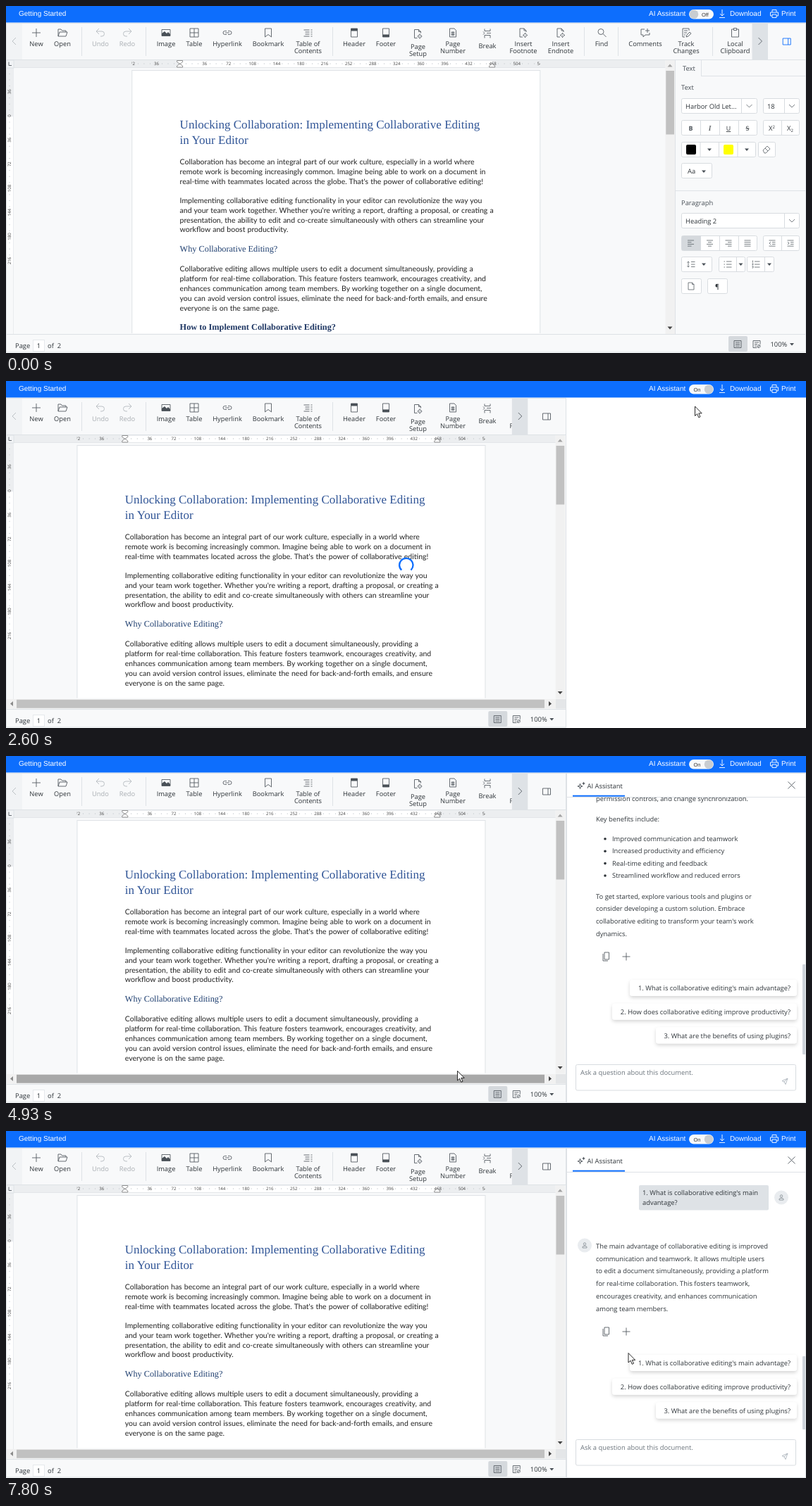
Write an HTML page that moves like this. It is 1135 by 493 pixels and loops after 8000 ms.

```html
<!DOCTYPE html>
<html lang="en">
<head>
<meta charset="utf-8">
<title>Document editor with assistant</title>
<style>
html, body { margin: 0; width: 100%; height: 100%; overflow: hidden; background: #fff; }
svg { display: block; width: 1135px; height: 493px; }
text { font-family: "Open Sans", "Noto Sans", sans-serif; font-size: 9.4px; fill: #2f353a; text-rendering: geometricPrecision; white-space: pre; }
.bar { font-family: "Liberation Sans", Arial, sans-serif; font-size: 10px; fill: #fff; }
.body { font-family: Lato, sans-serif; font-size: 10.5px; word-spacing: .5px; fill: #222; }
.h1, .h2, .h3 { font-family: "Liberation Serif", serif; fill: #2f5496; }
.h1 { font-size: 17.04px; }
.h2 { font-size: 12.3px; fill: #1f3f70; }
.h3 { font-size: 12.3px; font-weight: 700; fill: #1f3763; }
.tick { font-size: 6.1px; fill: #444; }
.tool { font-size: 9.3px; }
.sub { font-size: 6px; }
.ic { fill: none; stroke: #565d64; stroke-width: .9; }
#pane .ic { stroke-width: .8; }
</style>
</head>
<body>
<svg id="stage" viewBox="0 0 1135 493" xmlns="http://www.w3.org/2000/svg"></svg>
<script>
const BLUE = '#0d6efd', LINE = '#dee2e6', SOFT = '#f8f9fa', EDGE = '#d8dce0', PT = 0.9466;

const rect = (x, y, x2, y2, fill, extra = '') =>
  `<rect x="${x}" y="${y}" width="${x2 - x}" height="${y2 - y}" fill="${fill}" ${extra}/>`;
const text = (x, y, s, extra = '') => `<text x="${x}" y="${y}" ${extra}>${s}</text>`;
const mid = (x, y, s, extra = '') => text(x, y, s, 'text-anchor="middle" ' + extra);
const icon = (x, y, d, extra = '') => `<path class="ic" transform="translate(${x} ${y})" d="${d}" ${extra}/>`;
const solid = (x, y, d, fill = '#495057') => `<path transform="translate(${x} ${y})" d="${d}" fill="${fill}"/>`;
const hline = (x, x2, y, c = LINE) => rect(x, y, x2, y + 1, c);
const vline = (x, y, y2, c = LINE) => rect(x, y, x + 1, y2, c);
const group = (id, s, extra = '') => `<g id="${id}" ${extra}>${s}</g>`;
const clip = (id, x, y, x2, y2) => `<clipPath id="${id}">${rect(x, y, x2, y2, '#000')}</clipPath>`;
const lines = (x, y, step, list, extra) => list.map((s, i) => text(x, y + i * step, s, extra)).join('');
const chevron = (x, y) => icon(x, y, 'M-4-2L0 2L4-2');
const caret = (x, y, c) => solid(x, y, 'M-3-1.5H3L0 2Z', c);
const box = (x, y, x2, y2, fill = '#fff') =>
  rect(x + .5, y + .5, x2 - .5, y2 - .5, fill, `rx="2" stroke="${EDGE}"`);

// ---- top bar ----
function topBar() {
  return rect(0, 0, 1135, 23.5, BLUE) + text(18, 14, 'Getting Started', 'class="bar"') +
    text(912, 14, 'AI Assistant', 'class="bar"') +
    rect(969, 5, 1004, 18.5, '#f8f9fa', 'rx="6.7"') +
    '<circle id="knob" cy="11.7" r="6.3" fill="#c9cdd1"/>' +
    '<text id="state" class="bar" y="14.7" style="font-size:7.4px;fill:#333"></text>' +
    icon(1016, 11, 'M0-6V3M-3 0L0 3L3 0M-4 5.5H4', 'style="stroke:#fff"') +
    text(1027, 14, 'Download', 'class="bar"') +
    icon(1090, 11, 'M-3-2V-5.5H3V-2M-3 3H-5.5V-2H5.5V3H3M-3 1H3V5.5H-3Z', 'style="stroke:#fff"') +
    text(1100, 14, 'Print', 'class="bar"');
}

// ---- toolbar ----
const SHEET = 'M-1 6H-5V-6H1L4-3V-1M1-6V-3H4';
const GEAR = SHEET + 'M2.5 1.2a2.3 2.3 0 1 0 .1 0M2.5 3v1M2.5 0v1.2M2.5 5.8V7M-.8 3.5H.2M4.8 3.5h1';
const TOOLS = [
  [43, 'New', 'M-6 0H6M0-6V6'],
  [80, 'Open', 'M-6 5V-5H-2L-.5-3H5V-1M-6 5L-4-1H7L5 5Z'],
  [134, 'Undo', 'M-6-2H2a3.5 3.5 0 0 1 0 7H0M-2-6L-6-2L-2 2'],
  [172, 'Redo', 'M6-2H-2a3.5 3.5 0 0 0 0 7H0M2-6L6-2L2 2'],
  [227, 'Image', 'M-6-4.5H6V4.5H-6Z'],
  [267, 'Table', 'M-6-6H6V6H-6ZM0-6V6M-6 0H6'],
  [314, 'Hyperlink', 'M-1-2.5H-3.5a2.5 2.5 0 0 0 0 5H-1M1-2.5H3.5a2.5 2.5 0 0 1 0 5H1M-3 0H3'],
  [372, 'Bookmark', 'M-4.5-6H4.5V6L0 2.5L-4.5 6Z'],
  [428.5, 'Table of|Contents', 'M-6-4H2M4-4H6M-4-1H2M4-1H6M-4 2H2M4 2H6M-6 5H2M4 5H6'],
  [494, 'Header', 'M-4.5-6H4.5V6H-4.5Z'],
  [539, 'Footer', 'M-4.5-6H4.5V6H-4.5Z'],
  [584.5, 'Page|Setup', GEAR, 4],
  [634, 'Page|Number', 'M-4.5-6H2L4.5-3.5V6H-4.5ZM-2.5 0H2.5M-2.5 2.5H2.5M-1-2V4.5M1-2V4.5'],
  [683, 'Break', 'M-4-7V-4H4V-7M-4 6V2H4V6M-6-3L-4-1L-6 1M-1-1H5', 3],
  [734, 'Insert|Footnote', GEAR],
  [787, 'Insert|Endnote', GEAR],
  [845, 'Find', 'M3-1.5a4 4 0 1 1-8 0a4 4 0 1 1 8 0M2 1.5L6.5 6'],
  [907, 'Comments', 'M-1-5H-6V3H-3V6L0 3H6V0M3-6V0M0-3H6'],
  [965, 'Track|Changes', 'M4-3V-6H-5V6H-2M-3-3H2M-3 0H1M-3 3H-1M0 6L1 3L5-1L7 1L3 5Z'],
  [1034.5, 'Local|Clipboard', 'M-2-5H-5V6H5V-5H2M-2-6.5H2V-3.5H-2Z']
];

function tools() {
  let s = '';
  for (const [x, label, d, drop = 0] of TOOLS) {
    const off = label === 'Undo' || label === 'Redo';
    s += icon(x, 38 + (drop ? 1.5 : 0), d, off ? 'style="stroke:#b5babf"' : '');
    label.split('|').forEach((part, i) => {
      s += mid(x, 56.5 + drop + i * 10.3, part, `class="tool" ${off ? 'style="fill:#a9aeb3"' : ''}`);
    });
  }
  s += solid(227, 38, 'M-6 4.5V1L-2-2L1 1L3-1L6 2V4.5Z');
  s += solid(494, 38, 'M-4.5-6H4.5V-2.5H-4.5Z') + solid(539, 38, 'M-4.5 2.5H4.5V6H-4.5Z');
  for (const x of [107, 198, 463, 820, 868, 1002]) s += vline(x, 30, 71);
  return s;
}

// ---- document ----
const P1 = ['Collaboration has become an integral part of our work culture, especially in a world where',
  'remote work is becoming increasingly common. Imagine being able to work on a document in',
  "real-time with teammates located across the globe. That's the power of collaborative editing!"];
const P2 = ['Implementing collaborative editing functionality in your editor can revolutionize the way you',
  "and your team work together. Whether you're writing a report, drafting a proposal, or creating a",
  'presentation, the ability to edit and co-create simultaneously with others can streamline your',
  'workflow and boost productivity.'];
const P3 = ['Collaborative editing allows multiple users to edit a document simultaneously, providing a',
  'platform for real-time collaboration. This feature fosters teamwork, encourages creativity, and',
  'enhances communication among team members. By working together on a single document,',
  'you can avoid version control issues, eliminate the need for back-and-forth emails, and ensure',
  'everyone is on the same page.'];

function page(x) {
  const left = x - 72 * PT, cls = c => `class="${c}"`;
  return rect(left + .3, 91.5, left + 612 * PT, 600, '#fff', `stroke="${LINE}"`) +
    lines(x, 174.3, 21.4, ['Unlocking Collaboration: Implementing Collaborative Editing', 'in Your Editor'], cls('h1')) +
    lines(x, 225, 13.8, P1, cls('body')) + lines(x, 280, 13.8, P2, cls('body')) +
    text(x, 349, 'Why Collaborative Editing?', cls('h2')) +
    lines(x, 377.3, 13.8, P3, cls('body')) +
    text(x, 460, 'How to Implement Collaborative Editing?', cls('h3'));
}

function rulers(x, end) {
  const right = x + 468 * PT, grey = '#eceef0', dot = '#ced2d6';
  let s = rect(0, 77, end, 88, grey) + rect(x, 78, right, 87, '#fff') + hline(0, end, 87, '#e3e6e9');
  s += rect(0, 88, 11, 157, grey) + rect(1, 157, 10, 367, '#fff') + vline(10, 88, 466, '#e9ecef');
  s += rect(0, 77, 11, 88, '#f1f3f5', `stroke="${LINE}"`) + icon(5, 82, 'M-1-2.5V2.5H3');
  let marks = '';
  for (let p = -72; p <= 540; p += 9) {
    const tx = x + p * PT;
    if (p % 36) marks += rect(tx, 81, tx + .8, 83, dot);
    else if (p) marks += mid(tx + 1, 84, Math.abs(p), 'class="tick"');
  }
  s += `<g clip-path="url(#hr${x})">${marks}</g>`;
  for (let p = -63; p <= 216; p += 9) {
    const ty = 156 + p * PT * 1.007;
    s += p % 36 ? rect(4, ty, 6, ty + .8, dot)
      : mid(0, 0, Math.abs(p), `class="tick" transform="translate(7 ${ty}) rotate(-90)"`);
  }
  const mark = 'fill="#fff" stroke="#777" stroke-width=".8"';
  s += `<path d="M${x - 4} 77.5h8v2l-4 3l-4-3zM${x - 4} 87h8v-2l-4-3l-4 3z" ${mark}/>`;
  return s + `<path d="M${right - 4} 87h8v-2l-4-3l-4 3z" ${mark}/>`;
}

// Editor shell: doc = text left edge, bar = scrollbar left, nav = toolbar arrow left
function shell(o) {
  const { doc, bar, nav, end, bottom, thumb, id } = o;
  const shift = nav - 1058.5;
  let s = `<defs>${clip('t' + id, 24, 25, nav, 76)}${clip('d' + id, 11, 88, bar, bottom - 1)}` +
    `${clip('hr' + doc, doc - 72 * PT, 76, doc + 540 * PT, 88)}</defs>`;
  s += rect(0, 24, end, 492, SOFT) + hline(0, end, 24) + `<g clip-path="url(#t${id})">${tools()}</g>`;
  s += rect(1, 25, 23, 76, '#f1f3f5') + icon(11.5, 50, 'M2.5-5L-2.5 0L2.5 5', 'style="stroke:#b5babf"');
  s += rect(nav, 25, nav + 22.5, 76, '#dee2e6') + icon(nav + 11.5, 50, 'M-2.5-5L2.5 0L-2.5 5');
  s += icon(nav + 49.2, 50.5, 'M-5.5-4.5H5.5V4.5H-5.5ZM2-4.5V4.5', id === 'wide' ? `style="stroke:${BLUE}"` : '');
  s += hline(0, end, 76) + `<g clip-path="url(#d${id})">${page(doc)}</g>` + rulers(doc, bar);
  s += rect(bar, 77, bar + 13.5, bottom, '#f1f1f1') + rect(bar + .8, 92, bar + 12.5, thumb, '#c1c1c1');
  s += solid(bar + 6.5, 84.5, 'M-3.5 2H3.5L0-2Z', '#a3a3a3') + solid(bar + 6.5, bottom - 8.5, 'M-3.5-2H3.5L0 2Z', '#444');
  if (id === 'slim') {
    s += rect(1, 452, 780, 465.5, '#f1f1f1') + rect(780, 452, 794, 465.5, '#e4e6e8') +
      rect(15, 452.7, 764, 464.7, '#c1c1c1', 'id="hthumb"') +
      solid(8, 458.5, 'M2-3.5V3.5L-2 0Z', '#8a8a8a') + solid(772, 458.5, 'M-2-3.5V3.5L2 0Z', '#444');
  }
  s += hline(0, end, 466) + text(13, 486, 'Page') + rect(38.5, 474.5, 54.5, 490.5, '#fff', 'stroke="#e6e9ec"') +
    mid(46.5, 486, '1') + text(59, 486, 'of&#160; 2');
  s += rect(1025 + shift, 469, 1052 + shift, 491, '#d5d9dd', 'rx="2"');
  s += icon(1038 + shift, 480.5, 'M-5-5H5V5H-5ZM-3-2.5H3M-3 0H3M-3 2.5H3');
  s += icon(1065 + shift, 480.5, 'M0 5H-5V-5H5V0M-3-2.5H3M-3 0H1M-3 2.5H0M3 1a2 2 0 1 0 .1 0M1 5L5 1');
  s += text(1084.5 + shift, 484, '100%') + caret(1115 + shift, 480.5);
  return s + vline(0, 24, 492) + hline(0, end, 491.5) + vline(end - 1, 24, 492);
}

// ---- formatting pane ----
function pane() {
  const split = (x, x2, y, step) => {
    let s = box(x, y, x2, y + 22);
    for (let v = x + step; v < x2 - 5; v += step) s += vline(v, y + 1, y + 21, EDGE);
    return s;
  };
  const drop = (x, x2, cut, y, s) => box(x, y, x2, y + 22) + vline(cut, y, y + 22, EDGE) +
    text(x + 6, y + 14.7, s) + chevron((cut + x2) / 2, y + 11);
  const rows = (a, b, c) => `M${a}-4H${b}M${a}-1.3H${c}M${a} 1.4H${b}M${a} 4.1H${c}`;
  const label = 'style="fill:#495057;font-weight:500"';
  let s = rect(949, 77, 1134, 466, SOFT) + vline(949, 77, 466) + vline(986, 77, 99) + hline(986, 1135, 99);
  s += text(960, 92, 'Text', label) + text(958, 118.5, 'Text', label);
  s += drop(958, 1066, 1043, 131, 'Harbor Old Let...') + drop(1074, 1126, 1104, 131, '18');
  s += split(958, 1066, 162, 27) + split(1074, 1126, 162, 26);
  s += mid(971.5, 177, 'B', 'style="font-weight:700;font-size:8.8px;fill:#495057"') +
    mid(998.5, 177, 'I', 'style="font-family:\'Liberation Serif\',serif;font-style:italic;font-size:10.5px"') +
    mid(1025, 177, 'U', 'text-decoration="underline" style="font-size:8.8px"') +
    mid(1052, 177, 'S', 'text-decoration="line-through" style="font-size:8.8px"');
  s += text(1082, 177, 'X<tspan dy="-3" class="sub">2</tspan>') + text(1108, 177, 'X<tspan dy="2" class="sub">2</tspan>');
  s += split(958, 1064, 193, 26.5) + rect(965, 197, 979, 211, '#000', 'rx="2"') + caret(998, 204) +
    rect(1018, 197, 1032, 211, '#ff0', 'rx="2"') + caret(1051, 204);
  s += box(1067, 193, 1092, 215) + icon(1079, 204, 'M-5 1L1-5L5-1L-1 5H-3ZM-2-2L2 2');
  s += box(958, 223, 1002, 245) + text(967, 238, 'Aa') + caret(990, 235);
  s += hline(950, 1135, 262) + text(958, 282.5, 'Paragraph', label) + drop(958, 1126, 1104, 294, 'Heading 2');
  s += split(958, 1066, 326, 27) + split(1074, 1126, 326, 26) + rect(959, 327, 985, 347, '#d5d9dd');
  s += icon(971.5, 337, rows(-4.5, 4.5, 1)) + icon(998.5, 337, 'M-4.5-4H4.5M-2.5-1.3H2.5M-4.5 1.4H4.5M-2.5 4.1H2.5') +
    icon(1025, 337, 'M-4.5-4H4.5M-1-1.3H4.5M-4.5 1.4H4.5M-1 4.1H4.5') + icon(1052, 337, rows(-4.5, 4.5, 4.5));
  s += icon(1087, 337, 'M-4.5-4H4.5M0-1.3H4.5M0 1.4H4.5M-4.5 4.1H4.5M-2-2L-4 0L-2 2') +
    icon(1113, 337, 'M-4.5-4H4.5M0-1.3H4.5M0 1.4H4.5M-4.5 4.1H4.5M-4-2L-2 0L-4 2');
  s += box(958, 356, 1002, 378) + icon(972, 367, 'M-4-4V4M-5.5-2.5L-4-4L-2.5-2.5M-5.5 2.5L-4 4L-2.5 2.5M0-3.5H5.5M0 0H5.5M0 3.5H5.5') + caret(990, 367);
  const bullets = 'M-5.5-4H-4M-5.5 0H-4M-5.5 4H-4', numbers = 'M-4.5-5.5V-2.5M-5.5-1H-4V.5H-5.5M-5.5 2.5H-4V5H-5.5';
  for (const [x, x2, cut, marks] of [[1011, 1049, 1036, bullets], [1051, 1090, 1076, numbers]])
    s += box(x, 356, x2, 378) + vline(cut, 357, 377, EDGE) + caret((x2 + cut) / 2, 367) +
      icon(x + 13, 367, marks + 'M-2-4H5.5M-2 0H5.5M-2 4H5.5');
  s += box(958, 387, 987, 409) + icon(972, 398, 'M-4-5H1.5L4-2.5V5H-4ZM1.5-5V-2.5H4');
  return s + box(995, 387, 1024, 409) + mid(1009, 402, '¶');
}

// ---- assistant panel ----
const person = (x, y) => `<circle cx="${x}" cy="${y}" r="10" fill="#e9ecef"/>` +
  icon(x, y, 'M1.7-2a1.7 1.7 0 1 1-3.4 0a1.7 1.7 0 1 1 3.4 0M-3 3.5V2.5Q-3 1-1 1H1Q3 1 3 2.5V3.5Z', 'style="stroke:#8a9198"');
const question = y => rect(898, y, 1082, y + 35.5, '#dee2e6', 'rx="2"') +
  lines(903, y + 14, 14.2, ["1. What is collaborative editing's main", 'advantage?']) + person(1100, y + 17.5);
const thumbBar = (y, y2) => rect(1130, y, 1134.5, y2, '#ced4da', 'rx="1"');

function firstAnswer() {
  let s = text(837, 63.5, 'permission controls, and change synchronization.') + text(837, 93, 'Key benefits include:');
  ['Improved communication and teamwork', 'Increased productivity and efficiency', 'Real-time editing and feedback',
    'Streamlined workflow and reduced errors'].forEach((item, i) => {
    const y = 121 + i * 17.4;
    s += text(860, y, item) + `<circle cx="850" cy="${y - 3.2}" r="1.8" fill="#2f353a"/>`;
  });
  return s + lines(837, 202.5, 17.7, ['To get started, explore various tools and plugins or',
    'consider developing a custom solution. Embrace', "collaborative editing to transform your team's work", 'dynamics.']);
}

function followUps() {
  let s = icon(851, 285, 'M-4-4V6H3M-2-6H4.5V4H-2Z') + icon(880, 285, 'M-5.5 0H5.5M0-5.5V5.5');
  [[885, "1. What is collaborative editing's main advantage?"], [860, '2. How does collaborative editing improve productivity?'],
    [922, '3. What are the benefits of using plugins?']].forEach(([x, q], i) => {
    const y = 318 + i * 33.8;
    s += rect(x, y, 1122, y + 23, '#fff', 'rx="4" filter="url(#shade)"') +
      text(1113, y + 15, q, 'text-anchor="end"');
  });
  return s;
}

function waiting() {
  const bone = '#e8ebee';
  let s = question(234) + `<circle cx="821" cy="319.5" r="10" fill="${bone}"/>`;
  for (const [y, y2, x2] of [[310.5, 321, 1029], [325.5, 336, 981], [341, 351.5, 933], [356, 377.5, 1029]])
    s += rect(837, y, x2, y2, bone, 'rx="2"');
  s += rect(906, 399, 1023, 427, BLUE, 'rx="14" filter="url(#shade)"') + rect(918, 412, 928.5, 413.3, '#fff');
  return s + text(934, 416.5, 'Stop Responding', 'style="fill:#fff;font-weight:600;font-size:9.5px"') + thumbBar(293, 398);
}

const ANSWER = ['The main advantage of collaborative editing is improved', 'communication and teamwork. It allows multiple users',
  'to edit a document simultaneously, providing a platform', 'for real-time collaboration. This fosters teamwork,',
  'encourages creativity, and enhances communication', 'among team members.'];

function panel() {
  let s = `<defs>${clip('chat', 796, 59, 1135, 432)}</defs>` + rect(795, 24, 1135, 493, '#fff') + hline(795, 1135, 24);
  s += group('talk', group('first', firstAnswer()) +
    group('ask', followUps() + thumbBar(296, 424)) + group('wait', waiting()) +
    group('reply', question(77) + person(821, 162.5) + lines(837, 167, 17.7, ANSWER) + followUps() + thumbBar(320, 424)),
    'clip-path="url(#chat)"');
  s += solid(814.5, 43, 'M0-4.5L1.2-1.2L4.5 0L1.2 1.2L0 4.5L-1.2 1.2L-4.5 0L-1.2-1.2ZM0-2L-.6-.6L-2 0L-.6 .6L0 2L.6 .6L2 0L.6-.6Z') +
    solid(819.5, 39, 'M0-2.5L.7-.7L2.5 0L.7 .7L0 2.5L-.7 .7L-2.5 0L-.7-.7Z') + text(824.5, 45.5, 'AI Assistant');
  s += hline(795, 1135, 58) + rect(804, 55.7, 878, 57.7, BLUE) + icon(1114.5, 41.5, 'M-5-5L5 5M5-5L-5 5');
  s += box(808, 438, 1121, 475.5) + text(815, 453, 'Ask a question about this document.', 'style="fill:#6c757d"');
  s += icon(1105, 462, 'M4-4L-4-.5L-1 1L1 4.5ZM4-4L-1 1', 'style="stroke:#adb5bd"');
  return s + vline(795, 24, 493) + hline(795, 1135, 492) + vline(1134, 24, 493);
}

const ARROW = 'M.5 .5V14L3.6 11.2L5.8 16.3L8 15.3L5.8 10.4H10.2Z';
const HAND = 'M-1.5 1.5Q0-.8 1.3 1.5V6.5Q2.6 5.4 3.7 6.8Q5 5.9 5.9 7.3Q7.6 7 7.7 9V12.5Q7.5 15 6 16.2V18.5H-.5V17' +
  'Q-3 14-5.5 11Q-6 9-4.5 9.2L-1.5 11.5Z';

document.getElementById('stage').innerHTML =
  '<defs><filter id="shade" x="-10%" y="-40%" width="120%" height="200%">' +
  '<feDropShadow dx="0" dy="2.5" stdDeviation="2.8" flood-color="#000" flood-opacity=".16"/></filter></defs>' +
  group('wide', shell({ id: 'wide', doc: 246.6, bar: 935.5, nav: 1058.5, end: 1135, bottom: 466, thumb: 182.5 }) +
    group('pane', pane())) +
  group('slim', shell({ id: 'slim', doc: 168.8, bar: 779.7, nav: 717.8, end: 795, bottom: 451.5, thumb: 175.5 })) +
  group('panel', panel()) + topBar() +
  `<circle id="spin" cx="567.8" cy="261.5" r="9.7" fill="none" stroke="${BLUE}" stroke-width="2.3" pathLength="360" stroke-dasharray="275 85"/>` +
  `<path id="arrow" d="${ARROW}" fill="#fff" stroke="#111" stroke-width=".9"/>` +
  `<path id="hand" d="${HAND}" fill="#fff" stroke="#111" stroke-width=".9"/>`;

// Pointer trips: [time, x, y]; the pointer rests between them and is away outside a trip
const TRIPS = [
  [[330, 1122, 470], [400, 1076, 320], [470, 1039, 194], [670, 1044, 199], [800, 1030, 170], [1000, 943, 75],
    [1200, 990, 14], [1730, 990, 14], [2000, 992, 12.5], [2530, 992, 12.5], [2600, 977, 35.5], [3000, 640, 200],
    [3400, 226, 446], [3470, 207, 455], [3600, 178, 478], [3670, 176, 500]],
  [[4930, 640, 447], [5130, 706, 353], [5270, 706, 353], [5400, 938, 329], [5600, 938, 329], [5730, 1038, 333],
    [7130, 1039, 332.5], [7730, 884, 314], [7800, 882.5, 315], [8000, 882.5, 315]]
];

function pointer(t) {
  const trip = TRIPS.find(p => t >= p[0][0] && t < p[p.length - 1][0]);
  if (!trip) return null;
  const i = trip.findIndex(p => p[0] > t), [t0, x0, y0] = trip[i - 1], [t1, x1, y1] = trip[i];
  const k = (t - t0) / (t1 - t0);
  return [x0 + (x1 - x0) * k, y0 + (y1 - y0) * k];
}

const el = id => document.getElementById(id);
const show = (id, on) => el(id).setAttribute('display', on ? 'inline' : 'none');
const within = (t, a, b) => t >= a && t < b;

function draw(ms) {
  const t = Math.round(Math.floor((ms + 5) * .015) * 100 / 15) * 10;
  const slim = t >= 2200, on = Math.min(1, Math.max(0, (t - 2000) / 200));
  show('wide', !slim);
  show('slim', slim);
  el('knob').setAttribute('cx', 976 + 21 * on);
  el('state').textContent = on > .5 ? 'On' : 'Off';
  el('state').setAttribute('x', on > .5 ? 975.5 : 987);
  el('hthumb').setAttribute('fill', within(t, 4930, 5000) ? '#a8a8a8' : '#c1c1c1');

  const busy = within(t, 6930, 7600);
  show('panel', t >= 4670);
  show('first', t < 7600);
  el('first').setAttribute('transform', `translate(0 ${busy ? -77.5 : 0})`);
  show('ask', t < 6930);
  show('wait', busy);
  show('reply', t >= 7600);

  show('spin', busy || within(t, 2270, 4670));
  const gap = (busy ? 225 + (t - 6930) * .48 : 90 + (t - 2600) * .48) % 360;
  el('spin').setAttribute('transform', `rotate(${gap + 42.5} 567.8 261.5)`);

  const at = pointer(t), grab = within(t, 1200, 2600) || within(t, 5930, 6930);
  show('arrow', at && !grab);
  show('hand', at && grab);
  if (at) el(grab ? 'hand' : 'arrow').setAttribute('transform', `translate(${at[0]} ${at[1]})`);
}

const start = performance.now();
function tick() {
  draw((performance.now() - start) % 8000);
  requestAnimationFrame(tick);
}
draw(0);
requestAnimationFrame(tick);
</script>
</body>
</html>
```
